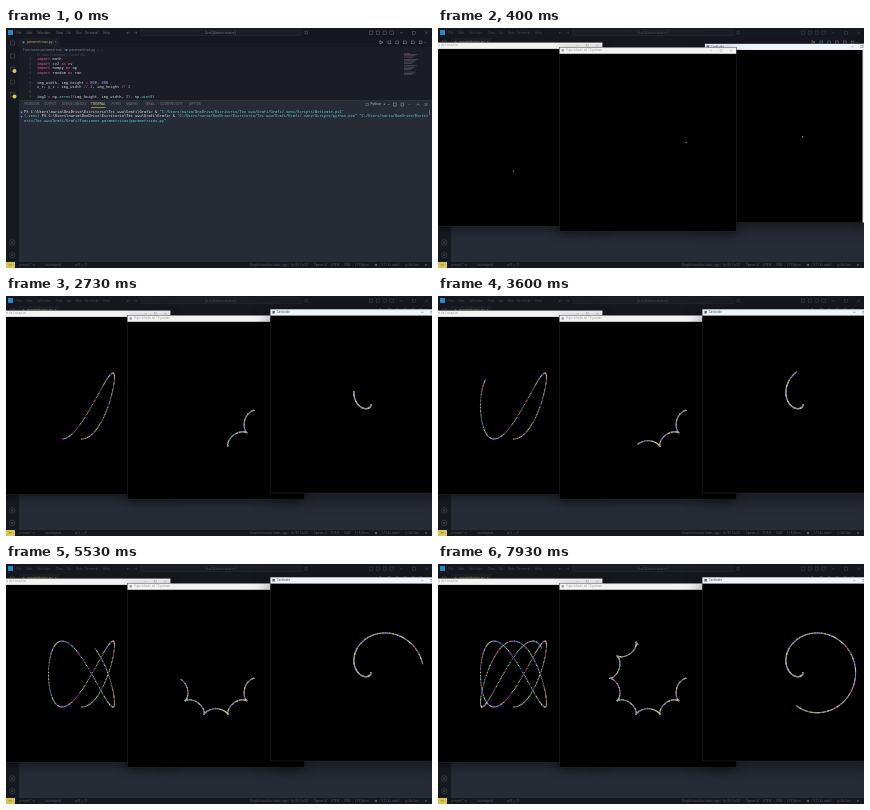
Animation, 426 px wide and 240 px high, one loop 8 s. Source, as an HTML page with a canvas:

```html
<!DOCTYPE html>
<html lang="es">
<head>
<meta charset="utf-8">
<style>
html, body { margin: 0; width: 100%; height: 100%; overflow: hidden; background: #14161d; }
canvas { display: block; width: 426px; height: 240px; }
</style>
</head>
<body>
<canvas id="stage" width="426" height="240"></canvas>
<script>
const ctx = document.getElementById('stage').getContext('2d');
const LOOP = 8000;
const MONO = '"DejaVu Sans Mono", monospace';
const SANS = '"Open Sans", "Noto Sans", sans-serif';
const rad = d => d * Math.PI / 180;

function box(x, y, w, h, color) {
  ctx.fillStyle = color;
  ctx.fillRect(x, y, w, h);
}
function frame(x, y, w, h, color, line = 0.5) {
  ctx.strokeStyle = color;
  ctx.lineWidth = line;
  ctx.strokeRect(x, y, w, h);
}
function disc(x, y, r, color) {
  ctx.fillStyle = color;
  ctx.beginPath();
  ctx.arc(x, y, r, 0, 7);
  ctx.fill();
}
function lines(color, width, ...paths) {
  ctx.strokeStyle = color;
  ctx.lineWidth = width;
  ctx.beginPath();
  for (const p of paths)
    for (let i = 0; i < p.length; i += 2) ctx[i ? 'lineTo' : 'moveTo'](p[i], p[i + 1]);
  ctx.stroke();
}
// Small type is laid out at ten times its size so its spacing stays even.
function text(str, x, y, color, size = 3.4, font = SANS) {
  ctx.save();
  ctx.translate(x, y);
  ctx.scale(0.1, 0.1);
  ctx.font = size * 10 + 'px ' + font;
  ctx.textBaseline = 'middle';
  ctx.fillStyle = color;
  ctx.fillText(str, 0, 0);
  const w = ctx.measureText(str).width / 10;
  ctx.restore();
  return x + w;
}
// parts: color, string, color, string, ...
function code(x, y, ...parts) {
  for (let i = 0; i < parts.length; i += 2) x = text(parts[i + 1], x, y, parts[i], 3.69, MONO);
}
const labels = (y, color, size, ...items) => {
  for (let i = 0; i < items.length; i += 2) text(items[i + 1], items[i], y, color, size);
};

function drawTop(active) {
  const dim = active ? '#747783' : '#4c4f59';
  box(0, 0, 426, 10, '#16181f');
  box(2, 2, 5, 5, '#2489ca');
  labels(4.8, dim, 3.2, 10.5, 'File', 20.5, 'Edit', 31, 'Selection', 50, 'View',
    60.5, 'Go', 70, 'Run', 79, 'Terminal', 97, 'Help');
  lines(dim, 0.4, [124, 4.8, 121, 4.8, 122.3, 3.5], [121, 4.8, 122.3, 6.1],
    [128, 4.8, 131, 4.8, 129.7, 3.5], [131, 4.8, 129.7, 6.1]);
  box(135, 1.8, 160, 6, '#1b1d25');
  frame(135, 1.8, 160, 6, '#2c2f39', 0.4);
  text('Graf [Administrator]', 199, 4.8, dim, 3.3);
  frame(299, 3.6, 2.4, 2.4, dim, 0.4);
  for (let i = 0; i < 4; i++) frame(363.5 + i * 6.8, 3, 3.4, 3.4, dim, 0.4);
  lines(dim, 0.4, [394, 4.8, 397, 4.8], [419, 3.4, 422, 6.4], [422, 3.4, 419, 6.4]);
  frame(406.5, 3.5, 2.8, 2.8, dim, 0.4);
}

function drawEditor() {
  const pink = '#ee5a9c', plain = '#d0d3dc', cyan = '#5fd0d8', gold = '#e0bc5c', num = '#b995f5';
  box(13, 10, 413, 9, '#16181f');
  box(13, 10, 41, 9, '#1d1f28');
  disc(17.5, 14.3, 1.1, '#4c86b8');
  text('parametricas.py', 21, 14.3, '#c5b55e', 3.4);
  text('×', 48.5, 14.3, '#9a9da8', 4);
  lines('#a0a3ae', 0.6, [374, 12.7, 377, 14.3, 374, 15.9, 374, 12.7]);
  for (let i = 0; i < 5; i++) frame(382 + i * 7.8, 13, 2.8, 2.8, '#858894');
  text('…', 418, 13.5, '#a0a3ae', 4);
  text('Funciones parametricas  ›', 17, 22, '#858894', 3.5);
  disc(60.5, 22, 1.1, '#4c86b8');
  text('parametricas.py  ›  …', 63, 22, '#858894', 3.5);
  text('Tú, hace 2 semanas | 1 autor (Tú)', 31, 26.8, '#4e515d', 3.1);

  const rows = [
    [pink, 'import ', plain, 'math'],
    [pink, 'import ', plain, 'cv2 ', pink, 'as ', plain, 'cv'],
    [pink, 'import ', plain, 'numpy ', pink, 'as ', plain, 'np'],
    [pink, 'import ', plain, 'random ', pink, 'as ', plain, 'ran'],
    [],
    [plain, 'img_width, img_height ', pink, '= ', num, '800', plain, ', ', num, '800'],
    [plain, 'x_c, y_c ', pink, '= ', plain, 'img_width ', pink, '// ', num, '2', plain,
      ', img_height ', pink, '// ', num, '2'],
    [],
    [plain, 'img1 ', pink, '= ', plain, 'np.', cyan, 'zeros', gold, '((', plain,
      'img_height, img_width, ', num, '3', gold, ')', plain, ', np.', cyan, 'uint8', gold, ')']
  ];
  rows.forEach((row, i) => {
    const y = 31 + i * 4.75;
    text(String(i + 1), 23, y, '#474a57', 3.5, MONO);
    code(31, y, ...row);
  });
  // minimap
  for (let i = 0; i < 18; i++)
    if (i % 5 != 4) box(398, 25 + i * 1.25, 6 + (i * 7 % 9), 0.6, i < 4 ? '#75466a' : '#555965');
}

function drawTerminal() {
  const dim = '#7b7e8a', plain = '#e4e6ee', str = '#55d3de';
  box(13, 72.5, 413, 161.5, '#272b36');
  box(13, 72.3, 413, 0.5, '#3a3e4b');
  labels(76.5, dim, 3, 18, 'PROBLEMS', 38, 'OUTPUT', 56, 'DEBUG CONSOLE', 105.5, 'PORTS',
    120, 'GRAPHS', 139, 'SERIAL', 154, 'QUERY RESULTS', 183, 'JUPYTER');
  text('TERMINAL', 85, 76.5, '#e6dc94', 3);
  box(85, 79, 14.5, 0.6, '#d9c74f');
  frame(360, 75.2, 2.6, 2.6, dim);
  text('Python', 364.5, 76.5, '#c9ccd6', 3.3);
  text('+  ⌄', 377, 76.3, '#c9ccd6', 4);
  frame(387.5, 75, 3, 3, '#a0a3ae');
  frame(395, 75, 2.6, 3, '#a0a3ae');
  text('…', 402, 75.8, '#a0a3ae', 4);
  lines('#a0a3ae', 0.5, [410.5, 77.5, 412, 75.7, 413.5, 77.5],
    [418.5, 75, 421.5, 78], [421.5, 75, 418.5, 78]);

  const home = 'Users/nuria/OneDrive/Escritorio/Tec uwu/Grafi/Grafi';
  const prompt = 'PS C:\\' + home.replaceAll('/', '\\') + '> & ';
  const path = '"C:/' + home;
  const script = path + '/Funciones parametricas/parametricas.py"';
  disc(15.5, 84.4, 0.9, '#4a9ad4');
  disc(15.5, 88.6, 0.9, '#4a9ad4');
  code(18, 84.4, plain, prompt, str, path + '/.venv/Scripts/Activate.ps1"');
  code(18, 88.5, '#58cd98', '(.venv) ', plain, prompt, str,
    path + '/.venv/Scripts/python.exe" ' + script.slice(0, 31));
  code(18, 92.6, str, script.slice(31));
  box(423, 82, 0.6, 5, '#8a8d98');
}

function drawBars() {
  const dim = '#454853', note = '#5c5f6a';
  box(0, 10, 13, 224, '#171920');
  [15, 28, 41, 54, 66.5].forEach((y, i) => frame(4.3, y - 2, 4, 4, dim, 0.6));
  disc(8.5, 43, 2, '#d9c74f');
  disc(8.5, 68.5, 2, '#d9c74f');
  for (const y of [214.5, 227]) {
    ctx.strokeStyle = dim;
    ctx.lineWidth = 0.6;
    ctx.beginPath();
    ctx.arc(6.3, y, 2.7, 0, 7);
    ctx.stroke();
    disc(6.3, y, 1, dim);
  }
  box(0, 234, 426, 6, '#16181f');
  box(0, 234, 9, 6, '#d9c74f');
  text('><', 2.4, 237, '#33342a', 3.2);
  labels(237, note, 3, 12, '⎇ main*  ↻', 39, 'Launchpad', 69, '⊗ 0  △ 0',
    244, 'Graph formulas (main, ago)', 285, 'Ln 93, Col 21', 308, 'Spaces: 4', 325, 'UTF-8',
    338, 'CRLF', 349, '{ } Python', 375, '3.11.4 (.venv)', 399, '◎ Go Live');
  disc(370, 237, 1.2, note);
  disc(420, 237, 0.9, note);
}

const lissajous = a => [75.5 + 33 * Math.sin(3 * a), 110 + 33 * Math.cos(5 * a)];
const hypocycloid = a => [
  210 + 34.2 * Math.cos(a) + 3.8 * Math.cos(9 * a),
  114.3 + 34.2 * Math.sin(a) - 3.8 * Math.sin(9 * a)
];
const limacon = a => {
  const r = 26.3 - 39 * Math.cos(a);
  return [352.3 - r * Math.cos(a), 108.8 - r * Math.sin(a)];
};

const wins = [
  { x: -12.3, y: 14.6, name: 'Curva de Lissajous', opens: 130, curve: lissajous },
  { x: 121.5, y: 19.5, name: 'Hipocicloide de 10 puntas', opens: 190, curve: hypocycloid },
  { x: 264.4, y: 13.3, name: 'Cardioide', opens: 330, curve: limacon, focus: true }
];
const W = 176.7, H = 183.7, BAR = 6.3;

// Degrees drawn so far, joined from a few timed points.
const pace = [[550, 0], [1800, 40.5], [3600, 100.5], [5530, 172], [6800, 218.5], [8000, 262.5]];
function degrees(t) {
  if (t <= pace[0][0]) return 0;
  const i = pace.findIndex(p => t < p[0]);
  const [t0, d0] = pace[i - 1], [t1, d1] = pace[i];
  return d0 + (d1 - d0) * (t - t0) / (t1 - t0);
}

function noise(n) {
  const s = Math.sin(n * 12.9898 + 4.1) * 43758.5453;
  return s - Math.floor(s);
}
function dotColor(i, k) {
  const c = j => Math.floor(40 + 215 * noise(i * 9 + k * 3 + j));
  return i ? `rgb(${c(0)},${c(1)},${c(2)})` : '#c8c8c8';
}

function drawWindow(win, k, t) {
  const u = Math.min(1, (t - win.opens) / 150);
  if (u < 0) return;
  const s = 1 - 0.1 * (1 - u) ** 2, { x, y, focus } = win;
  ctx.save();
  ctx.globalAlpha = Math.min(1, u * 3);
  ctx.translate(x + W / 2, y + H / 2);
  ctx.scale(s, s);
  ctx.translate(-x - W / 2, -y - H / 2);
  ctx.shadowColor = 'rgba(0,0,0,0.5)';
  ctx.shadowBlur = focus ? 16 : 10;
  ctx.shadowOffsetY = focus ? 5 : 3;
  box(x, y, W, H, '#000');
  ctx.shadowColor = 'transparent';
  frame(x, y, W, H, '#26282d', 0.5);
  box(x, y, W, BAR, focus ? '#edf4fb' : '#f3f3f3');
  if (focus && u < 1) box(x + W - 14.5, y, 14.5, H, '#f0f0f0');
  const ink = focus ? '#3c4046' : '#9a9a9a';
  box(x + 2, y + 1.6, 2.4, 2.6, focus ? '#5b6270' : '#a4a8ae');
  text(win.name, x + 6.3, y + 3, ink, 3);
  const b = x + W - 5, m = y + 3;
  lines(ink, 0.35, [b - 21, m, b - 18.6, m], [b - 1.2, m - 1.2, b + 1.2, m + 1.2],
    [b + 1.2, m - 1.2, b - 1.2, m + 1.2]);
  frame(b - 11.2, m - 1.1, 2.2, 2.2, ink, 0.35);
  const end = degrees(t) * 2;
  for (let i = 0; i <= end; i++) {
    const [px, py] = win.curve(rad(i / 2));
    disc(px, py, 0.62, dotColor(i, k));
  }
  ctx.restore();
}

function draw(now) {
  const t = now % LOOP;
  box(0, 0, 426, 240, '#1b1d26');
  drawTop(t < 130);
  drawEditor();
  drawTerminal();
  drawBars();
  const order = t < 460 ? [0, 2, 1] : [0, 1, 2];
  for (const k of order) drawWindow(wins[k], k, t);
  requestAnimationFrame(draw);
}
requestAnimationFrame(draw);
</script>
</body>
</html>
```
